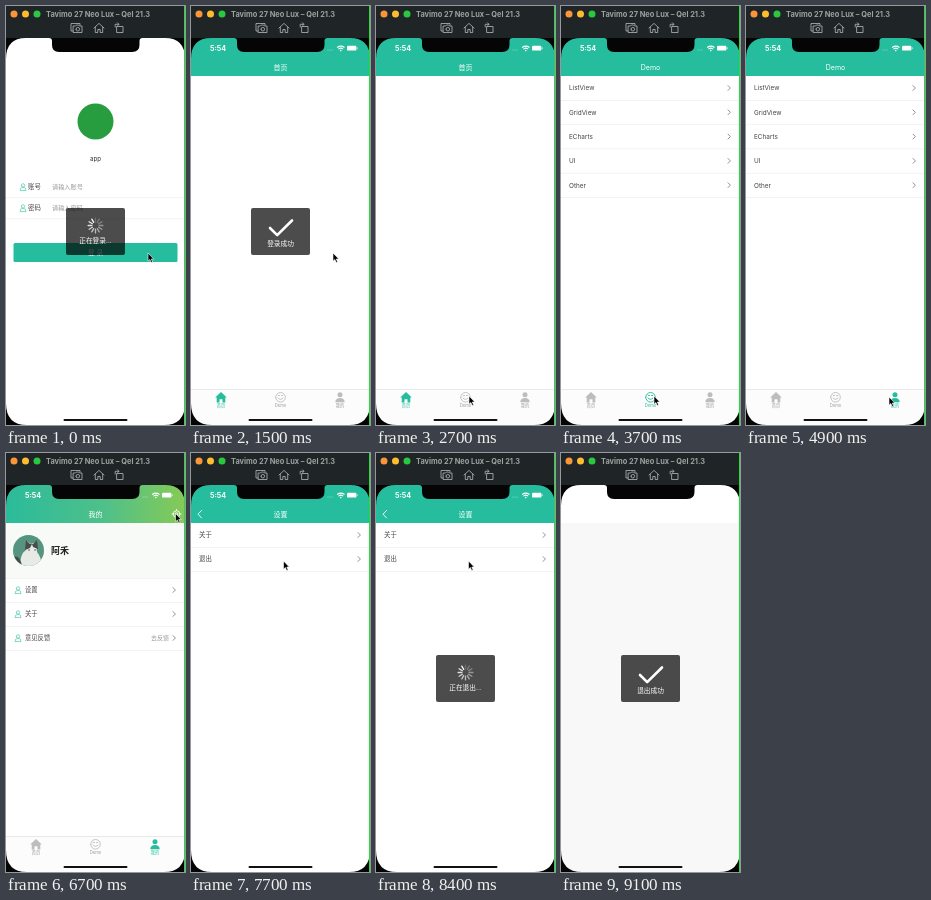
These frames come from a looping animation (179 px wide and 419 px high, 9.4 s). An HTML page:

```html
<!DOCTYPE html>
<html>
<head>
<meta charset="utf-8">
<title>App walkthrough</title>
<style>
html, body { margin: 0; width: 100%; height: 100%; overflow: hidden; background: #000; }
svg { display: block; width: 179px; height: 419px; }
text { font-family: Inter, "Noto Sans CJK SC", "Noto Sans CJK", sans-serif; }
</style>
</head>
<body>
<svg id="stage" viewBox="0 0 179 419"></svg>
<script>
const TEAL = '#25bd9d', GREY = '#bdbdbd', INK = '#444';
const LOOP = 9400;

const rect = (x, y, w, h, fill, r = 0) =>
  `<rect x="${x}" y="${y}" width="${w}" height="${h}" rx="${r}" fill="${fill}"/>`;
const circle = (x, y, r, fill) => `<circle cx="${x}" cy="${y}" r="${r}" fill="${fill}"/>`;
const line = (d, color, w = 0.8) =>
  `<path d="${d}" fill="none" stroke="${color}" stroke-width="${w}" stroke-linecap="round" stroke-linejoin="round"/>`;
const text = (s, x, y, size, fill = INK, anchor = 'start', weight = 400) =>
  `<text x="${x}" y="${y}" font-size="${size}" fill="${fill}" text-anchor="${anchor}" font-weight="${weight}">${s}</text>`;
const group = (id, body) => `<g id="${id}">${body}</g>`;
const rule = y => rect(0, y, 179, 0.6, '#ececec');
const chevron = y => line(`M167 ${y - 2.4}l2.4 2.4l-2.4 2.4`, '#777');

const outlinePerson = (x, y) =>
  line(`M${x - 1.7} ${y - 1.6}a1.7 1.7 0 1 0 3.4 0a1.7 1.7 0 1 0 -3.4 0M${x - 3} ${y + 3.2}q0-3 3-3t3 3z`, '#4fc9ae', 0.7);

const statusBar = () =>
  text('5:54', 19, 45, 7.2, '#fff', 'start', 700) +
  [137, 139, 141].map(x => circle(x, 44, 0.4, '#fff')).join('') +
  line('M146.5 41.3q3.3-2.4 6.6 0M147.8 42.9q2-1.5 4 0', '#fff', 1.1) + circle(149.8, 44.6, 0.8, '#fff') +
  rect(156, 39.8, 9.4, 4.8, '#fff', 1.2) + rect(165.8, 41.3, 0.7, 1.8, '#fff');

const header = (title, fill = TEAL) =>
  rect(0, 32, 179, 38, fill) + statusBar() + text(title, 89.5, 63.5, 7, '#fff', 'middle');

const row = (s, y) => text(s, 8, y + 2.4, 6.4) + chevron(y) + rule(y + 12);

const mineRow = (s, y) => outlinePerson(12, y) + text(s, 19, y + 2.3, 6.3) + chevron(y) + rule(y + 12);

function tabs(active) {
  const color = i => i === active ? TEAL : GREY;
  const labels = ['首页', 'Demo', '我的'];
  return rect(0, 383, 179, 36, '#fcfcfc') + rect(0, 383, 179, 0.6, '#dedede') +
    `<path d="M24.2 391.5L30 386l5.8 5.5h-1.5v5h-2.8v-3.3h-3v3.3h-2.8v-5z" fill="${color(0)}"/>` +
    line('M84.7 391.3a4.8 4.8 0 1 0 9.6 0a4.8 4.8 0 1 0 -9.6 0M87 392q2.5 3 5 0M87.3 389.5h1.2M90.5 389.5h1.2', color(1), 0.9) +
    circle(149, 388.8, 2.5, color(2)) +
    `<path d="M144.3 396.3q0-4 4.7-4.2q4.7.2 4.7 4.2z" fill="${color(2)}"/>` +
    labels.map((s, i) => text(s, 30 + i * 59.5, 401, 4.2, i === active ? TEAL : '#999', 'middle')).join('');
}

const field = (label, hint, y) =>
  outlinePerson(17, y) + text(label, 22, y + 2.4, 6.4) + text(hint, 46, y + 2.3, 6.2, '#999');

const blank = rect(0, 32, 179, 387, '#fff');

const avatar = `<g clip-path="url(#round)">
  ${rect(7, 82, 31, 31, '#55947f')}
  <path d="M14 113q0-12 6-16l1-9 4 3 5-2 1 10q5 6 4 14z" fill="#e8eae6"/>
  <path d="M19 97l1-10 4 4h3l4-4 1 9-5-2-1-3-2 4z" fill="#474d4a"/>
  <path d="M7 104q7-3 9 9H7z" fill="#424d48"/>
  ${circle(23, 97, 0.7, '#333')}${circle(29, 97, 0.7, '#333')}
</g>`;

const gear = line('M167.2 61a3.3 3.3 0 1 0 6.6 0a3.3 3.3 0 1 0 -6.6 0M169.2 61a1.3 1.3 0 1 0 2.6 0a1.3 1.3 0 1 0 -2.6 0', '#fff', 0.9) +
  line('M170.5 57v-.5M170.5 65v.5M166.5 61h-.5M174.5 61h.5', '#fff', 1);

const demoRows = ['ListView', 'GridView', 'ECharts', 'UI', 'Other'];

const pages = {
  login: blank + circle(89.5, 115.5, 18, '#289d3f') +
    text('app', 89.5, 154.5, 6.2, '#333', 'middle') +
    field('账号', '请输入账号', 181) + field('密码', '请输入密码', 202) +
    rule(191.5) + rule(212.5) +
    rect(7.5, 237, 164, 19, TEAL, 1.5) + text('登 录', 89.5, 249, 6.6, '#fff', 'middle'),
  home: blank + header('首页') + tabs(0),
  demo: blank + header('Demo') + demoRows.map((s, i) => row(s, 82 + i * 24.3)).join(''),
  mine: blank + header('我的', 'url(#fade)') + gear +
    rect(0, 70, 179, 55, '#f8faf7') + avatar + text('阿禾', 45, 101, 9, '#222', 'start', 600) + rule(125) +
    mineRow('设置', 137) + mineRow('关于', 161) + mineRow('意见反馈', 185) +
    text('去反馈', 163, 187.2, 6, '#999', 'end') + tabs(2),
  settings: blank + header('设置') + line('M10.5 57.5l-3.5 3.7l3.5 3.7', '#fff', 0.9) +
    row('关于', 82) + row('退出', 106),
  empty: blank + rect(0, 70, 179, 349, '#f8f8f8')
};

const spokes = Array.from({ length: 12 }, (_, i) =>
  `<path d="M0-3.6V-7.4" transform="rotate(${i * 30})" stroke="#fff" stroke-width="1.3" stroke-linecap="round" opacity="${0.2 + i * 0.07}"/>`).join('');

const frame = rect(0, 0, 179, 32, '#1f2526') +
  circle(8, 8, 3.5, '#fa9639') + circle(19.5, 8, 3.5, '#fdbd2e') + circle(31, 8, 3.5, '#29c840') +
  text('Tavimo 27 Neo Lux – Qel 21.3', 40, 11, 7.4, '#9da1a2', 'start', 700) +
  line('M67 25h-2v-7.5h9v1.5M67.5 20h2l1-1h2l1 1h2.5v6.5h-8.5zM70 23.2a1.8 1.8 0 1 0 3.6 0a1.8 1.8 0 1 0 -3.6 0', '#b5b8b8') +
  line('M88 22l5-4.6l5 4.6M89.3 21.2v5.3h2.5v-3h2.4v3h2.5v-5.3', '#b5b8b8') +
  line('M111 20.5h6v6h-6zM109.2 21v-2.7h3.6M111.5 16.8l1.5 1.5l-1.5 1.5', '#b5b8b8') +
  '<path d="M0 32H179V419H0ZM20 32Q0 32 0 53V397Q0 419 21 419H158Q179 419 179 397V53Q179 32 159 32Z" fill="#050505" fill-rule="evenodd"/>' +
  '<path d="M43 32Q46 32 46 35V39Q46 46 53 46H126Q133.5 46 133.5 39V35Q133.5 32 136.5 32Z" fill="#050505"/>' +
  rect(57.5, 413, 64, 2, '#111', 1) + rect(178, 0, 1, 419, '#20dd3c');

const stage = document.getElementById('stage');
stage.innerHTML = `<defs>
  <linearGradient id="fade"><stop stop-color="#2bbb9b"/><stop offset=".55" stop-color="#4fc08a"/><stop offset="1" stop-color="#86ca55"/></linearGradient>
  <clipPath id="round"><circle cx="22.5" cy="97.5" r="15.5"/></clipPath>
</defs>` +
  Object.entries(pages).map(([id, body]) => group(id, body)).join('') +
  group('demoTabs', tabs(1)) + group('mineTabs', tabs(2)) +
  group('toast', rect(60, 202, 59, 47, 'rgba(0,0,0,.7)', 2) +
    group('spinner', spokes) +
    group('check', line('M79 222l7.2 7.2L101 214.5', '#fff', 2.6)) +
    text('', 89.5, 236, 6.7, '#fff', 'middle')) +
  frame +
  group('cursor', '<path d="M0 0V8.2L1.9 6.5L3.2 9.5L4.6 8.9L3.3 6H5.8Z" fill="#000" stroke="#fff" stroke-width=".6"/>');

const el = id => document.getElementById(id);
const label = stage.querySelector('#toast text');
const show = (id, on) => { el(id).style.display = on ? '' : 'none'; };
const place = (id, x, y = 0) => el(id).setAttribute('transform', `translate(${x} ${y})`);
const between = (t, a, b) => t >= a && t < b;
const progress = (t, a, b) => Math.min(1, Math.max(0, (t - a) / (b - a)));
const ease = p => p * p * (3 - 2 * p);
const easeOut = p => 1 - (1 - p) ** 3;

// Pointer stops: arrival from the previous stop spans start..end.
const moves = [
  [0, 0, 142, 247], [2200, 2700, 93, 390], [3850, 4800, 143, 391],
  [5350, 6250, 169.5, 60.5], [7150, 7700, 92.5, 108]
];

function pointer(t) {
  let [, , x, y] = moves[0];
  for (const [start, end, tx, ty] of moves.slice(1)) {
    const p = ease(progress(t, start, end));
    x += (tx - x) * p;
    y += (ty - y) * p;
  }
  return [x, y];
}

// Each toast: start, end, message, loading
const toasts = [
  [0, 1100, '正在登录...', true], [1300, 2050, '登录成功', false],
  [7900, 8900, '正在退出...', true], [9000, LOOP, '退出成功', false]
];

function draw(now) {
  const t = now % LOOP;
  show('login', t < 1300);
  show('home', between(t, 1100, 3000));
  show('demo', between(t, 3000, 5000));
  show('demoTabs', between(t, 3000, 4900));
  show('mineTabs', between(t, 4900, 5000));
  show('mine', between(t, 5000, 7250));
  show('settings', between(t, 6900, 8900));
  show('empty', t >= 8900);

  place('home', 179 * (1 - easeOut(progress(t, 1080, 1300))));
  const push = easeOut(progress(t, 6880, 7250));
  place('mine', -50 * push);
  place('settings', 179 * (1 - push));

  const toast = toasts.find(([a, b]) => between(t, a, b));
  show('toast', toast);
  if (toast) {
    const [, , message, loading] = toast;
    show('spinner', loading);
    show('check', !loading);
    label.textContent = message;
    label.setAttribute('y', loading ? 236.5 : 240.3);
    el('spinner').setAttribute('transform', `translate(89.5 219.5) rotate(${Math.floor(t / 100) * 30})`);
  }
  show('cursor', t < 8900);
  place('cursor', ...pointer(t));
}

const begin = performance.now();
function tick() {
  draw(performance.now() - begin);
  requestAnimationFrame(tick);
}
tick();
</script>
</body>
</html>
```
